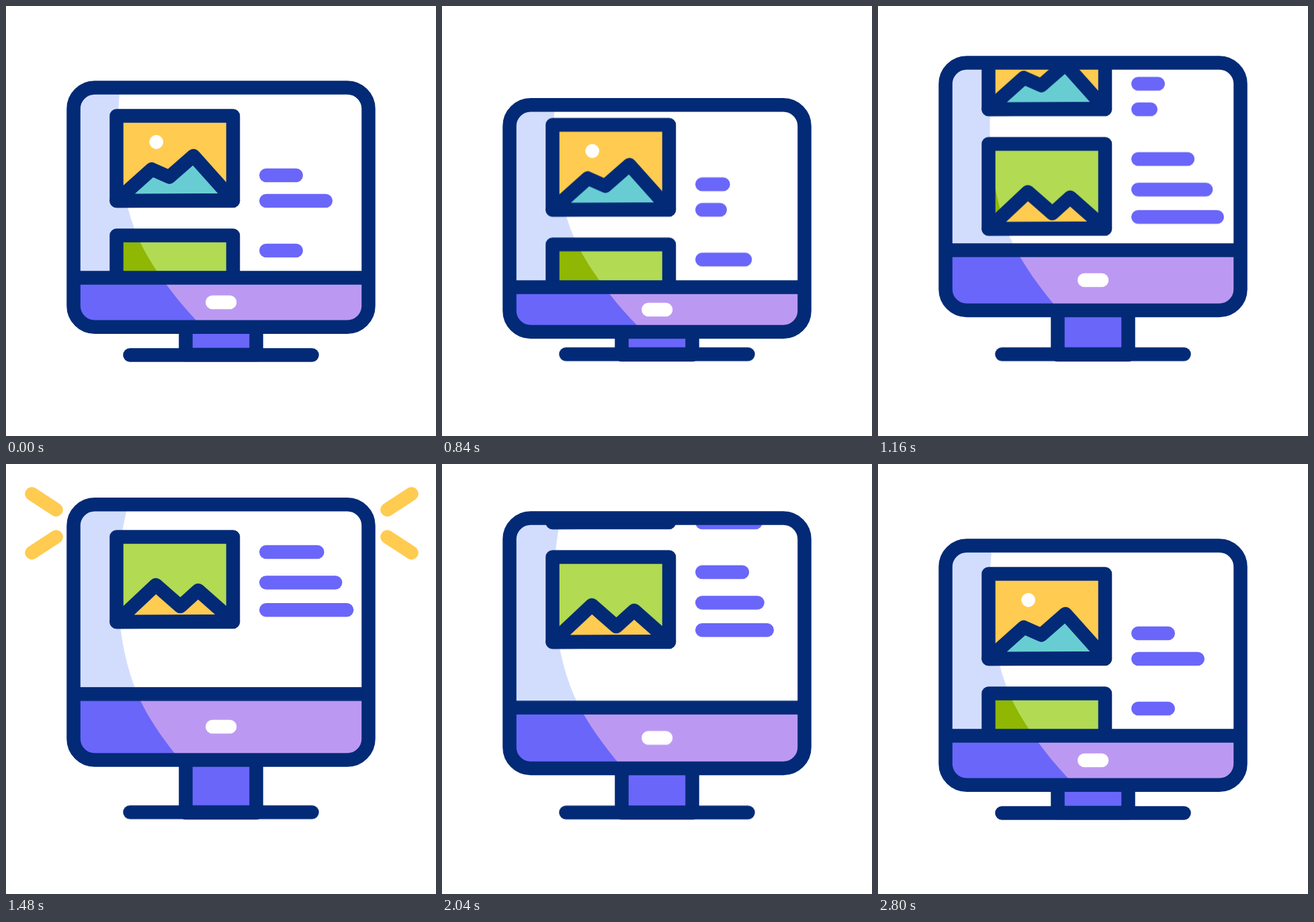
An HTML page that plays this animation: 640x640 px, repeating every 3000 ms.

```html
<!DOCTYPE html>
<html lang="en">
<head>
<meta charset="utf-8">
<title>Scrolling monitor</title>
<style>
  html, body { margin: 0; width: 100%; height: 100%; overflow: hidden; background: #fff; }
  svg { display: block; width: 100%; height: 100%; }

  :root {
    --navy: #032a76;
    --blue: #6a66f9;
    --lilac: #bb99f2;
    --sky: #d2ddfe;
    --sun: #ffcb50;
    --teal: #68cdd3;
    --lime: #b2da53;
    --olive: #8fb703;
  }

  .case, .shift, .scroll, .bar, .ray {
    animation: 3s cubic-bezier(.333, 0, .667, 1) infinite;
  }
  .line { fill: none; stroke: var(--navy); stroke-width: 20.5; stroke-linejoin: round; stroke-linecap: round; }

  /* Monitor body: squash, stretch, settle */
  .case { x: 100.5px; width: 439px; rx: 31.5px; animation-name: case; }
  @keyframes case {
    0%, 3.33%, 81.7%, 100% { y: 121.5px; height: 356.3px; }
    20.67% { y: 168.5px; height: 327.2px; }
    46.67%, 59.43% { y: 60.2px; height: 380.3px; }
  }

  /* Parts that ride along, each with its own reach */
  .shift { animation-name: shift; }
  @keyframes shift {
    0%, 3.33%, 81.7%, 100% { transform: translateY(0); }
    20.67% { transform: translateY(var(--down)); }
    46.67%, 59.43% { transform: translateY(var(--up)); }
  }
  .panel { --down: 32.5px; --up: -62.5px; }
  .pill { --down: 25.7px; --up: -50px; }
  .base { --down: -1.2px; --up: -1.2px; }

  /* Page content */
  .scroll { animation-name: scroll; }
  @keyframes scroll {
    0%, 3.33%, 83.03%, 100% { transform: translateY(0); }
    25.9% { transform: translateY(20px); }
    48%, 63.7% { transform: translateY(-233px); }
  }

  /* Text bars change length between --a and --b */
  .bar { x: 377px; height: 20.5px; rx: 10.25px; fill: var(--blue); width: var(--a); }
  .b1 { --a: 65px; --b: 50px; animation-name: shrink; }
  .b2 { --a: 109px; --b: 39px; animation-name: shrink; }
  .b3 { --a: 65px; --b: 97px; animation-name: grow; }
  .b4 { --a: 94px; --b: 124px; animation-name: grow-fast; }
  .b5 { --a: 107px; --b: 141px; animation-name: grow-fast; }
  @keyframes shrink {
    0%, 3.33%, 90%, 100% { width: var(--a); }
    34.67% { width: var(--b); }
    46.67% { width: var(--b); animation-timing-function: cubic-bezier(.333, 1, .667, 1); }
  }
  @keyframes grow {
    0%, 3.33%, 88%, 100% { width: var(--a); }
    46.67% { width: var(--b); }
  }
  @keyframes grow-fast {
    0%, 3.33%, 80%, 100% { width: var(--a); }
    46.67% { width: var(--b); }
  }

  /* Rays draw outwards, then leave outwards */
  .ray { fill: none; stroke: var(--sun); stroke-width: 20.5; stroke-linecap: round; stroke-dasharray: 1 3; animation-name: ray; }
  @keyframes ray {
    0%, 41.1% { stroke-dashoffset: 1; opacity: 0; }
    41.11% { stroke-dashoffset: 1; opacity: 1; }
    48.9%, 50% { stroke-dashoffset: 0; opacity: 1; }
    57.79% { stroke-dashoffset: -1; opacity: 1; }
    57.8%, 100% { stroke-dashoffset: -1; opacity: 0; }
  }
</style>
</head>
<body>
<svg viewBox="0 0 640 640">
  <defs>
    <path id="shade" d="M80 50H185C172 92 167 135 166.500 178C166 232 174 285 191 331C203 363 220 389 239 415C256 438 274 459 295 480L320 505H80Z"/>
    <clipPath id="screen"><rect class="case"/></clipPath>
    <clipPath id="panel"><rect class="shift panel" x="90" y="404.500" width="460" height="180"/></clipPath>
    <clipPath id="photo"><rect class="scroll" x="164.500" y="341.500" width="173.500" height="126.500"/></clipPath>
    <path id="ray" pathLength="1" d="M75 68L38.500 44"/>
  </defs>

  <!-- Stand -->
  <rect class="line" x="267.500" y="420" width="105" height="99" style="fill: var(--blue)"/>
  <path class="line shift base" d="M184.500 519.500H455.500"/>

  <!-- Screen -->
  <g clip-path="url(#screen)">
    <rect width="640" height="640" fill="#fff"/>
    <use href="#shade" fill="var(--sky)"/>

    <g class="scroll">
      <rect x="164.500" y="163.500" width="173.500" height="126.500" fill="var(--sun)"/>
      <circle cx="223.700" cy="202.500" r="10.400" fill="#fff"/>
      <path class="line" d="M164.500 290L217 243L243 254.500L279 223L338 289Z" style="fill: var(--teal)"/>
      <rect class="line" x="164.500" y="163.500" width="173.500" height="126.500"/>
      <rect x="164.500" y="341.500" width="173.500" height="126.500" fill="var(--lime)"/>
    </g>
    <g clip-path="url(#photo)"><use href="#shade" fill="var(--olive)"/></g>
    <g class="scroll">
      <path class="line" d="M164.500 468L223 413L259.500 445L286 421L338 467Z" style="fill: var(--sun)"/>
      <rect class="line" x="164.500" y="341.500" width="173.500" height="126.500"/>
      <rect class="bar b1" y="241.700"/>
      <rect class="bar b2" y="279.700"/>
      <rect class="bar b3" y="353.700"/>
      <rect class="bar b4" y="399.300"/>
      <rect class="bar b5" y="439.900"/>
    </g>

    <rect class="shift panel" x="90" y="404.500" width="460" height="180" fill="var(--lilac)"/>
    <g clip-path="url(#panel)"><use href="#shade" fill="var(--blue)"/></g>
    <path class="line shift panel" d="M100 404.500H540"/>
  </g>
  <rect class="line case"/>
  <rect class="shift pill" x="297" y="430.800" width="46.300" height="20.500" rx="10.250" fill="#fff"/>

  <!-- Rays -->
  <g id="rays">
    <path class="ray" pathLength="1" d="M74.500 68L38.500 44.500"/>
    <path class="ray" pathLength="1" d="M74.500 108.500L38.500 132"/>
    <path class="ray" pathLength="1" d="M567.500 68L603.500 44.500"/>
    <path class="ray" pathLength="1" d="M567.500 108.500L603.500 132"/>
  </g>
</svg>
</body>
</html>
```
